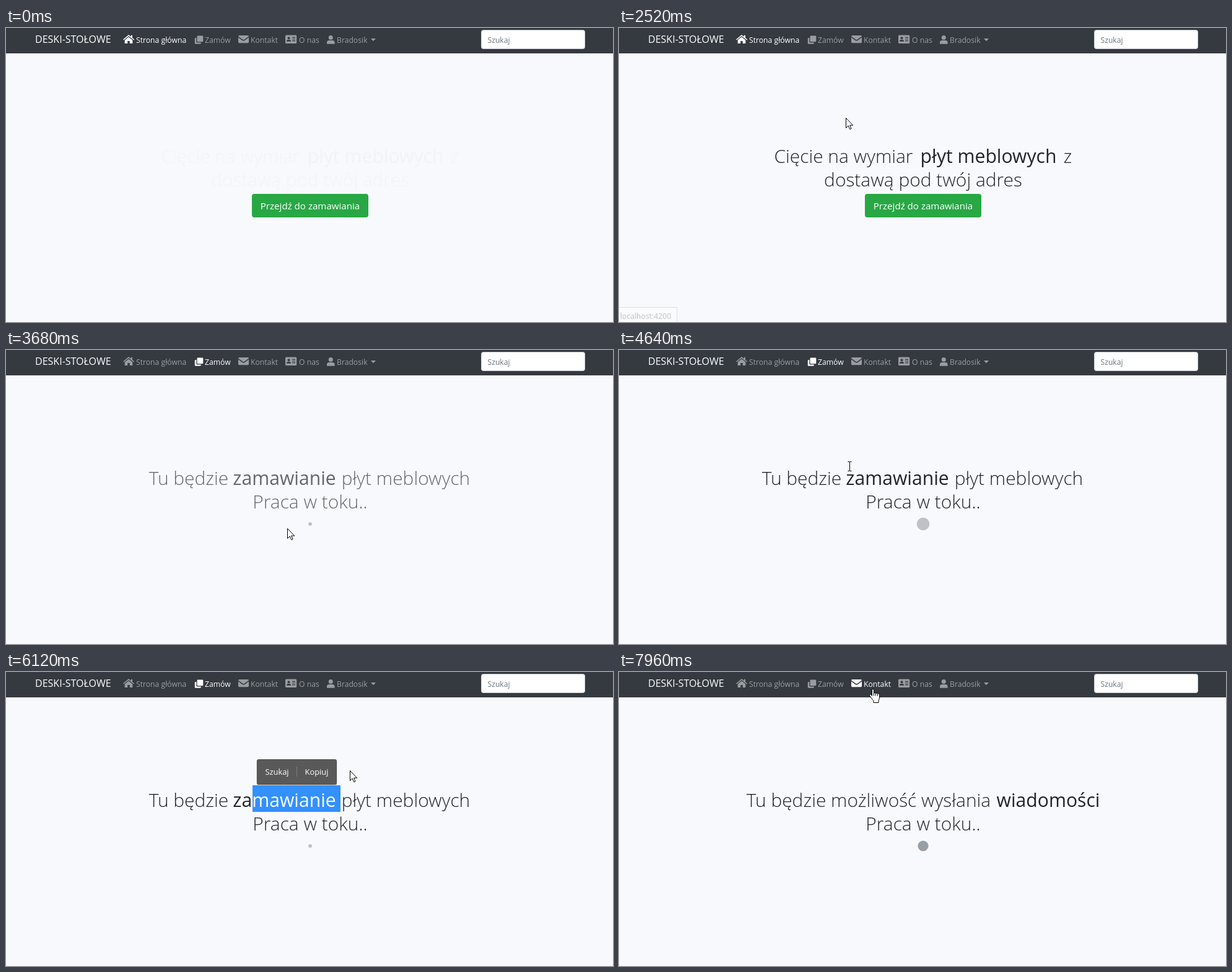
Recreate the animation shown at these times as an HTML page. Size 980 by 475 pixels, loop 8 s.

```html
<!DOCTYPE html>
<html lang="pl">
<head>
<meta charset="utf-8">
<title>Cięcie na wymiar</title>
<style>
html, body { margin: 0; width: 100%; height: 100%; overflow: hidden; background: #f8f9fc; }
svg { display: block; width: 980px; height: 475px; }
text { font-family: "Open Sans", "Noto Sans", sans-serif; white-space: pre; }
.nav { font-size: 12.2px; }
.head text { font-size: 29.9px; font-weight: 300; text-anchor: middle; fill: #212529; }
.head text.strong { font-size: 30.1px; font-weight: 400; }
.head text.picked { fill: #fff; }
</style>
</head>
<body>
<svg viewBox="0 0 980 475">
  <defs>
    <clipPath id="pickClip"><rect id="pickArea" x="398" y="183" width="0" height="43"/></clipPath>
  </defs>
  <rect width="980" height="475" fill="#f8f9fc"/>
  <rect width="980" height="41" fill="#343a40"/>
  <text x="47" y="24" font-size="16" fill="#fff">DESKI-STOŁOWE</text>

  <g class="nav">
    <g id="home">
      <path d="M189 18.4 198 11l3.8 3.1V11.7h2.2v4.2l3.2 2.5-1 1.2-8.2-6.7-8 6.7z"/>
      <path d="M191.7 19.6 198 14.4l6.3 5.2V25h-4.5v-4h-3.6v4h-4.5z"/>
      <text x="210" y="24">Strona główna</text>
    </g>
    <g id="order">
      <rect x="308.5" y="12.5" width="9.8" height="9.8" rx="1.3"/>
      <path d="M307.3 16v6q0 1.5 1.5 1.5h6v1q0 1.3-1.3 1.3h-7.4q-1.3 0-1.3-1.3v-7.2q0-1.3 1.3-1.3z"/>
      <text x="321" y="24">Zamów</text>
    </g>
    <g id="contact">
      <path d="M375 13.6q0-1.6 1.6-1.6h13.8q1.6 0 1.6 1.6l-7 5q-1.5 1-3 0z"/>
      <path d="M375 15.3l6.4 4.6q2.1 1.4 4.2 0l6.4-4.6v7.3q0 1.6-1.6 1.6h-13.8q-1.6 0-1.6-1.6z"/>
      <text x="395" y="24">Kontakt</text>
    </g>
    <g id="about">
      <path fill-rule="evenodd" d="M452.5 11.5h15.2q1.5 0 1.5 1.5v10.4q0 1.5-1.5 1.5h-15.2q-1.5 0-1.5-1.5V13q0-1.5 1.5-1.5zM456.5 14.2a2 2 0 1 0 .01 0zM453 21.7h7q0-2.7-2.2-2.7h-2.6q-2.2 0-2.2 2.7zM462 14.8v1.2h5v-1.2zM462 17.4v1.2h5v-1.2zM462 20v1.2h5V20z"/>
      <text x="473" y="24">O nas</text>
    </g>
    <g id="user">
      <circle cx="524.3" cy="15.5" r="3.5"/>
      <path d="M518 25.7v-2q0-3.7 3.7-3.7h5.2q3.7 0 3.7 3.7v2z"/>
      <text x="534" y="24">Bradosik</text>
      <path d="M589 17h8l-4 4.2z"/>
    </g>
    <rect x="767.5" y="3.5" width="167" height="30" rx="3" fill="#fff" stroke="#ced4da"/>
    <text x="777.5" y="24" fill="#6c757d">Szukaj</text>
  </g>

  <g id="pages" class="head"></g>

  <g id="button">
    <rect id="buttonFace" x="397" y="268" width="188" height="38" rx="4"/>
    <text x="491" y="293" font-size="15.1" text-anchor="middle" fill="#fff">Przejdź do zamawiania</text>
  </g>

  <circle id="spinner" cx="491" cy="281" fill="#6c757d"/>

  <g id="pick" class="head">
    <rect id="pickFill" x="398" y="183" width="0" height="43" fill="#3390ff"/>
    <g clip-path="url(#pickClip)"><text class="strong picked" x="449.5" y="218">zamawianie</text></g>
  </g>

  <g id="popup" font-size="12.9" fill="#fff">
    <rect x="404.5" y="142" width="130" height="41" rx="2" fill="#000" opacity=".16"/>
    <rect x="405.5" y="141.5" width="128" height="40" rx="2" fill="#595959" stroke="#4a4a4a"/>
    <path d="M469.5 153v16" stroke="#7d7d7d"/>
    <text x="437.5" y="166" text-anchor="middle">Szukaj</text>
    <text x="501.5" y="166" text-anchor="middle">Kopiuj</text>
  </g>

  <g id="status">
    <rect id="statusBox" x="-.5" y="451.5" height="25" fill="#fff" stroke="#b9bcc0"/>
    <text id="statusText" x="2" y="470" font-size="12.2" fill="#6a6d70"></text>
  </g>

  <g id="arrow"><path d="M.5 .5v16l3.7-3.5 2.6 5.7 2.3-1-2.5-5.5h5.1z" fill="#fff" stroke="#000"/></g>
  <g id="beam"><path d="M-2.5 -7.5h2.5l.5.5.5-.5h2.500M.5-7V7M-2.5 7.500h2.500L.5 7l.5.5h2.500" fill="none" stroke="#000"/></g>
  <g id="hand"><path d="M-1.5 1q0-1.500 1.500-1.500T1.500 1v6q0-1.500 1.500-1.500T4.500 7.200q0-1.300 1.500-1.300T7.500 7.700q0-1 1.300-1t1.700 2v4.500q0 3-1.500 5v3.300H1v-3Q-1 16.500-3 13.500L-5.300 10.300q-.6-1.500.6-2t2.200 1l1 1.300z" fill="#fff" stroke="#000"/><path d="M1.500 7v3.500M4.500 7v3.500M7.500 7.700v3" stroke="#000"/></g>
</svg>
<script>
const LOOP = 8000, STEP = 40;
const ORDER_AT = 3546, CONTACT_AT = 7557;
const SPIN = 610, SPIN_RADIUS = 13;
const $ = id => document.getElementById(id);
const clamp = v => Math.max(0, Math.min(1, v));
const ramp = (t, from, to) => clamp((t - from) / (to - from));
const within = (t, from, to) => t >= from && t < to;
const show = (id, on) => $(id).setAttribute('visibility', on ? 'visible' : 'hidden');
const set = (id, attrs) => {
  for (const key in attrs) $(id).setAttribute(key, attrs[key]);
};

// Heading runs: centre x, baseline, text, strong
const pages = [
  { start: -4, link: 'home', runs: [
    [362.5, 218, 'Cięcie na wymiar'], [596.5, 218, 'płyt meblowych', true], [724.5, 218, 'z'],
    [491, 256, 'dostawą pod twój adres']] },
  { start: ORDER_AT, link: 'order', runs: [
    [295, 218, 'Tu będzie'], [449.5, 218, 'zamawianie', true], [645.5, 218, 'płyt meblowych'],
    [491, 256, 'Praca w toku..']] },
  { start: CONTACT_AT, link: 'contact', runs: [
    [403, 218, 'Tu będzie możliwość wysłania'], [693, 218, 'wiadomości', true],
    [491, 256, 'Praca w toku..']] }
];

const addSvg = (tag, parent) =>
  parent.appendChild(document.createElementNS('http://www.w3.org/2000/svg', tag));

pages.forEach((page, i) => {
  const g = addSvg('g', $('pages'));
  g.id = 'page' + i;
  for (const [x, y, label, strong] of page.runs) {
    const text = addSvg('text', g);
    text.setAttribute('x', x);
    text.setAttribute('y', y);
    if (strong) text.setAttribute('class', 'strong');
    text.textContent = label;
  }
});

// Pointer path: time, x, y, shape from that time on
const path = [
  [1440, 140, 1, 'arrow'], [1520, 147, 8, 'hand'], [1640, 154, 14, 'hand'],
  [1960, 154, 14, 'hand'], [2320, 176, 36, 'arrow'], [2520, 366, 145, 'arrow'],
  [2760, 432, 268, 'hand'], [2960, 454, 288, 'hand'], [ORDER_AT, 454, 288, 'arrow'],
  [4000, 454, 288, 'arrow'], [4200, 412, 240, 'beam'], [4480, 376, 182, 'beam'],
  [4640, 372, 188, 'beam'], [4840, 398, 205, 'beam'], [5040, 500, 206, 'beam'],
  [5160, 540, 205, 'beam'], [5480, 540, 205, 'beam'], [5800, 541, 176, 'arrow'],
  [6120, 555, 159, 'arrow'], [6360, 570, 150, 'arrow'], [6520, 560, 145, 'arrow'],
  [6720, 500, 126, 'arrow'], [7000, 327, 37, 'arrow'], [7120, 340, 24, 'hand'],
  [7300, 404, 20, 'hand'], [7440, 410, 28, 'hand'], [LOOP, 410, 28, 'hand']
];

// Link hints: text, box width, fade in from/to, fade out from/to
const hints = [
  ['localhost:4200', 94, 1480, 1640, 2400, 2600],
  ['localhost:4200/zamow', 140, 2880, 3120, 3420, 3600],
  ['localhost:4200/kontakt', 146, 7200, 7340, 7440, 7560]
];

function drawPointer(t) {
  const i = path.findIndex((p, k) => k < path.length - 1 && within(t, p[0], path[k + 1][0]));
  const shape = i < 0 ? '' : path[i][3];
  for (const id of ['arrow', 'beam', 'hand']) show(id, id === shape);
  if (i < 0) return;
  const [t0, x0, y0] = path[i], [t1, x1, y1] = path[i + 1];
  const k = ramp(t, t0, t1);
  const x = Math.round(x0 + (x1 - x0) * k), y = Math.round(y0 + (y1 - y0) * k);
  set(shape, { transform: `translate(${x} ${y})` });
}

function drawHint(t) {
  const hint = hints.find(h => within(t, h[2], h[5]));
  show('status', hint);
  if (!hint) return;
  const [label, width, in0, in1, out0, out1] = hint;
  $('statusText').textContent = label;
  set('statusBox', { width });
  set('status', { opacity: ramp(t, in0, in1) * (1 - ramp(t, out0, out1)) });
}

function drawSelection(t) {
  const width = 108 * ramp(t, 4840, 5040) + 34 * ramp(t, 5040, 5160);
  show('pick', within(t, 4840, 6440));
  set('pickFill', { width });
  set('pickArea', { width });
  show('popup', within(t, 5360, 6440));
}

function draw(t) {
  const current = t < ORDER_AT ? 0 : t < CONTACT_AT ? 1 : 2;
  const { start, link } = pages[current];
  pages.forEach((_, i) => show('page' + i, i === current));
  set('page' + current, { opacity: Math.sin(Math.PI / 2 * ramp(t, start, start + 280)) });

  for (const id of ['home', 'order', 'contact', 'about', 'user']) {
    const hover = id === 'contact' && t >= 7280;
    set(id, { fill: id === link ? '#fff' : hover ? '#ccced0' : '#9a9da0' });
  }

  show('button', current === 0);
  set('buttonFace', { fill: within(t, 2780, ORDER_AT) ? '#218838' : '#28a745' });

  show('spinner', current > 0);
  const phase = (t - start) / SPIN % 1;
  set('spinner', { r: SPIN_RADIUS * phase, opacity: 1 - Math.abs(2 * phase - 1) });

  drawSelection(t);
  drawHint(t);
  drawPointer(t);
}

const began = performance.now();
function tick() {
  const t = (performance.now() - began) % LOOP;
  draw(Math.floor(t / STEP) * STEP);
  requestAnimationFrame(tick);
}
tick();
</script>
</body>
</html>
```
